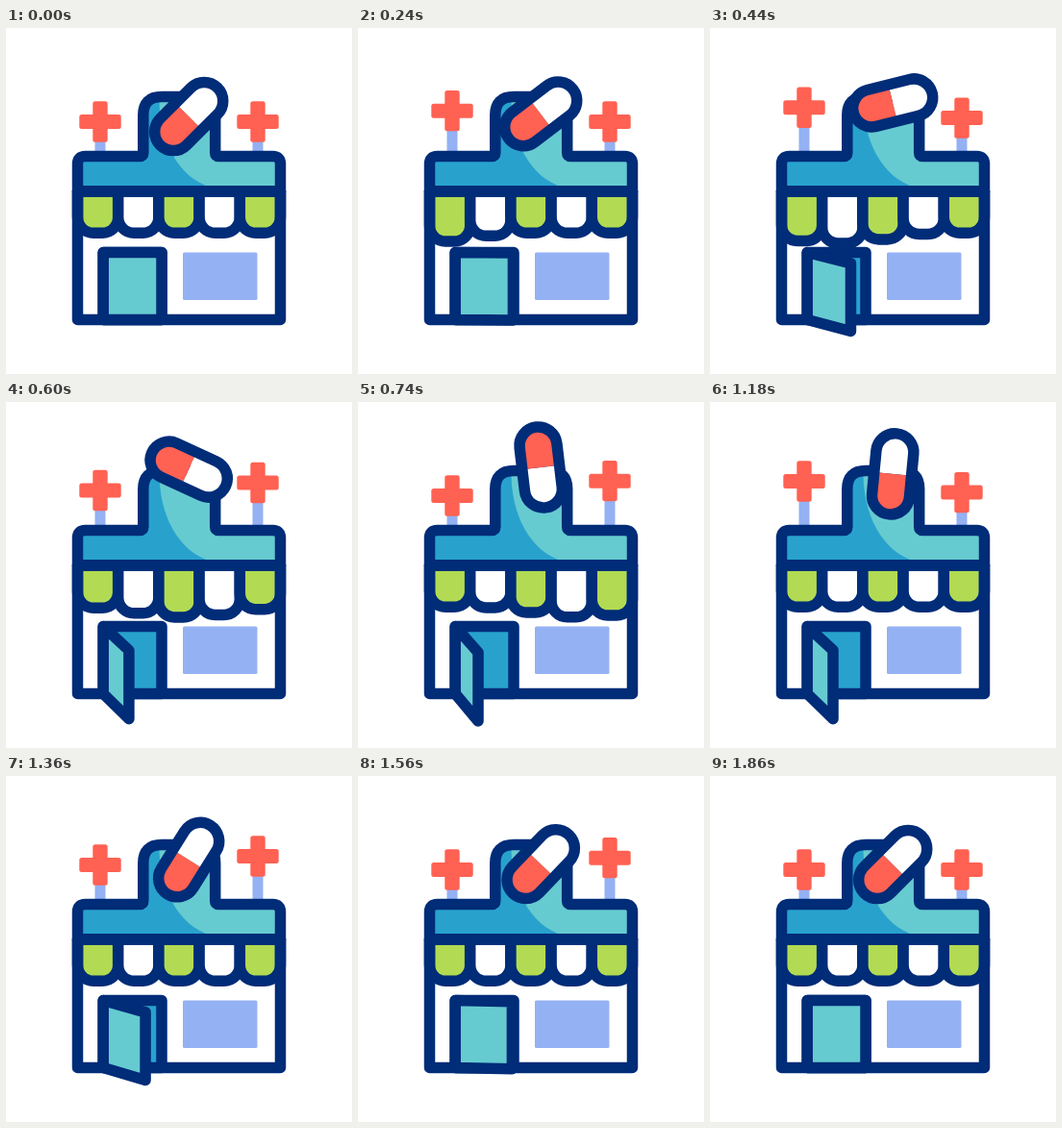
Write an HTML page that moves like this. It is 360 px wide and 360 px high and loops after 2.4 s.

```html
<!DOCTYPE html>
<html lang="en">
<head>
<meta charset="utf-8">
<title>Pharmacy</title>
<style>
  html, body { margin: 0; width: 100%; height: 100%; overflow: hidden; background: #fff; }
  svg { display: block; width: 100vw; height: 100vh; }
  .line { stroke: #002c78; stroke-width: 11.5; stroke-linejoin: round; stroke-linecap: round; }
  .none { fill: none; }
  .white { fill: #fff; }
  .light { fill: #66cbd0; }
  .deep { fill: #28a2cd; }
  .blue { fill: #94b1f4; }
  .red { fill: #ff6152; }
  .green { fill: #b2db53; }
</style>
</head>
<body>
<svg viewBox="0 0 360 360">
  <defs>
    <path id="roof" d="M74.500 170V141.500Q74.500 133.500 82.500 133.500H139.500Q142.800 133.500 142.800 130V90.500Q142.800 71.500 162 71.500H199Q217.700 71.500 217.700 90.500V130Q217.700 133.500 221 133.500H277.500Q285.500 133.500 285.500 141.500V170Z"/>
    <clipPath id="inRoof"><use href="#roof"/></clipPath>
    <g id="cross">
      <rect class="blue" x="-5.500" y="15" width="11" height="45"/>
      <rect class="red" x="-7.700" y="-21.200" width="15.400" height="42.400" rx="2.500"/>
      <rect class="red" x="-21.700" y="-7.500" width="43.400" height="15" rx="2.500"/>
    </g>
  </defs>

  <use id="crossL" href="#cross"/>
  <use id="crossR" href="#cross"/>

  <rect class="white" x="74.500" y="170" width="211" height="133.500"/>
  <use href="#roof" class="deep"/>
  <path class="light" clip-path="url(#inRoof)" d="M159.500 70C158.500 114 177 155 214 166H290V70Z"/>
  <use href="#roof" class="line none"/>

  <rect class="blue" x="184" y="233.500" width="77.500" height="49.500" rx="1.500"/>
  <g id="awning"></g>
  <path class="line none" d="M74.500 170H285.500V303.500H74.500Z"/>

  <rect class="line deep" x="101.200" y="233.500" width="60.800" height="70"/>
  <path id="door" class="line light"/>

  <g id="pill">
    <path class="white" d="M0 -19.500H22.700A19.500 19.500 0 0 1 22.700 19.500H0Z"/>
    <path class="red" d="M0 -19.500H-22.700A19.500 19.500 0 0 0 -22.700 19.500H0Z"/>
    <rect class="line none" x="-42.200" y="-19.500" width="84.400" height="39" rx="19.500"/>
  </g>
</svg>
<script>
const LOOP = 2400;
const $ = id => document.getElementById(id);
const clamp = v => Math.min(1, Math.max(0, v));
const span = (t, from, to) => clamp((t - from) / (to - from));
const smooth = u => u * u * (3 - 2 * u);

// Symmetric cubic-bezier(k, 0, 1 - k, 1), solved by bisection
function steep(u, k = 0.63) {
  let lo = 0, hi = 1;
  for (let i = 0; i < 24; i++) {
    const s = (lo + hi) / 2, r = 1 - s;
    const x = 3 * k * s * r * r + 3 * (1 - k) * s * s * r + s * s * s;
    if (x < u) lo = s; else hi = s;
  }
  return smooth((lo + hi) / 2);
}

// Rise and fall, each taking `half` ms, repeated `count` times
function bump(t, start, half, count = 1) {
  const p = (t - start) / half;
  if (p <= 0 || p >= 2 * count) return 0;
  const u = p % 2;
  return smooth(u < 1 ? u : 2 - u);
}

const STRIP = 42.2;
const strips = Array.from({ length: 5 }, (_, i) => {
  const el = document.createElementNS("http://www.w3.org/2000/svg", "path");
  el.setAttribute("class", "line " + (i % 2 ? "white" : "green"));
  $("awning").append(el);
  return el;
});

function drawStrip(el, i, drop) {
  const l = 74.5 + i * STRIP, r = l + STRIP, b = 213.3 + drop, c = 16.5;
  el.setAttribute("d",
    `M${l} 170V${b - c}A${c} ${c} 0 0 0 ${l + c} ${b}H${r - c}A${c} ${c} 0 0 0 ${r} ${b - c}V170Z`);
}

function drawDoor(open) {
  const x = 162 - 37 * open, top = 233.5 + 27 * open, bottom = 303.5 + 28.5 * open;
  $("door").setAttribute("d", `M101.200 233.500L${x} ${top}V${bottom}L101.200 303.500Z`);
}

const place = (id, x, y, turn = 0) =>
  $(id).setAttribute("transform", `translate(${x} ${y}) rotate(${turn})`);

function draw(t) {
  place("crossL", 98, 97.5 - 16 * bump(t, 0, 375, 2));
  place("crossR", 262, 97.5 - 16 * bump(t, 320, 375, 2));
  strips.forEach((el, i) => drawStrip(el, i, 10.8 * bump(t, i * 125, 333)));
  drawDoor(steep(span(t, 167, 750)) - steep(span(t, 1000, 1700)));

  const lift = steep(span(t, 0, 833)) - steep(span(t, 833, 1667));
  place("pill", 190.2, 92 - 24.3 * lift, -45 + 360 * steep(span(t, 0, 1667)));
}

const begin = performance.now();
function tick() {
  draw((performance.now() - begin) % LOOP);
  requestAnimationFrame(tick);
}
draw(0);
requestAnimationFrame(tick);
</script>
</body>
</html>
```
